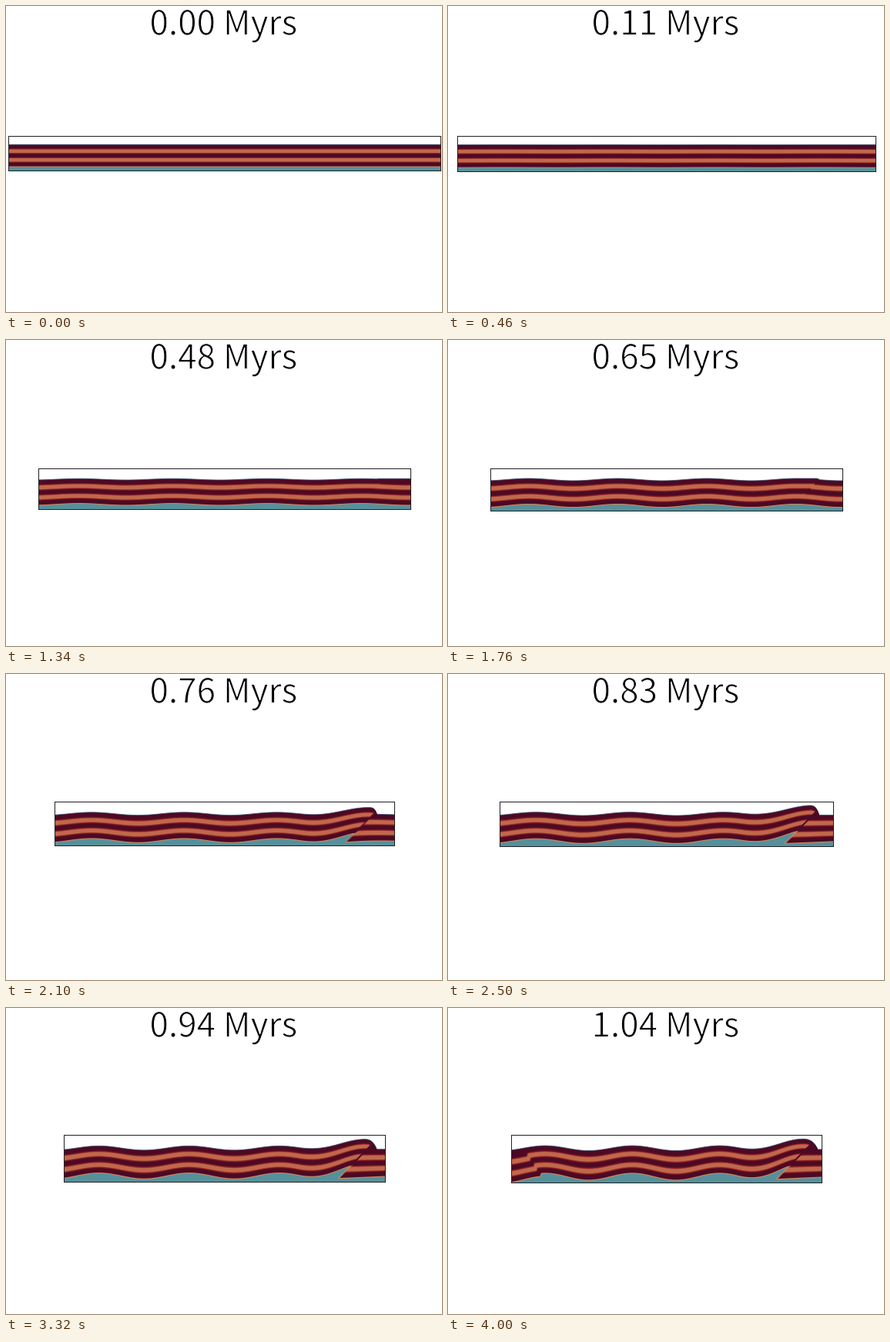
A matplotlib script for the animation above (4.02 s loop, 566 by 398 pixels).

```python
import numpy as np
import matplotlib.pyplot as plt
from matplotlib.animation import FuncAnimation
from matplotlib.patheffects import Stroke

W, H, DPI, FRAMES = 566, 398, 100, 201
Y0, Y1 = 160, 232

DARK, RED, ORANGE = (77, 9, 36), (134, 28, 30), (193, 104, 76)
TEAL, BLUE, SAND = (86, 144, 154), (62, 82, 112), (206, 136, 92)
WHITE, BORDER = (255, 255, 255), (32, 32, 36)

# Colours against depth, one unit per layer: two orange beds in dark rock
STOPS = [k + d for k in range(1, 5) for d in (-.2, 0, .2)] + [4.88, 5.02, 5.18]
RAMP = np.array([DARK, RED, ORANGE, ORANGE, RED, DARK] * 2
                + [DARK, SAND, TEAL], float)

x = np.arange(W) + 0.5
y = (np.arange(Y0, Y1) + 0.5)[:, None]


def clock(i):
    """Model age in Myrs; the time step shrinks as faults open."""
    return np.interp(i, [0, 27, 39, 88, 107, 200],
                     [0, .125, .243, .654, .777, 1.04])


def smooth(p):
    p = np.clip(p, 0, 1)
    return p * p * (3 - 2 * p)


def mix(img, color, weight):
    w = weight[..., None]
    return img * (1 - w) + np.array(color, float) * w


def strip(t):
    # The box shortens and thickens
    left = int(3.3 + t * (86 - 9.8 * t))
    right = 567 - left
    width = right - left
    top, bottom = round(169.2 - 4 * t), int(214 + 12.8 * t)
    u = (x - left - 0.5) / width

    # Buckling folds
    thrust = smooth((t - .65) / .18)
    wavelength = .253 + .028 * thrust
    fold = lambda u: -np.cos(2 * np.pi * (u - .108) / wavelength)
    surf_mid, base_mid = 180.2 + 2 * t, 208.8 + 10 * t
    surf_amp = 3 * t ** 1.7
    base_amp = 1.4 * surf_amp

    # Right block: its folds flatten once the thrust is active
    flat = lambda value, target: value + thrust * (target - value)
    foot_s = flat(surf_mid + surf_amp * fold(u), surf_mid + 1.6)
    foot_b = flat(base_mid + base_amp * fold(u),
                  base_mid + 3.2 - 18 * (u - .857))

    # Thrust sheet climbing over it, with a rounded nose
    rise = thrust * smooth((u - .73) / .19)
    held = fold(np.minimum(u, .108 + 3 * wavelength))
    hang_s = surf_mid + surf_amp * held - 9 * rise
    hang_b = base_mid + base_amp * held - 13 * rise
    nose = .958 + .14 * (t - .83)
    drop = np.clip((u - .92) / (nose - .92), 0, 1) ** 4
    hang_s += (foot_s - hang_s) * drop

    # Late back thrust at the left
    slip = 4 * smooth((t - .95) / .09)
    back = left + 30 - (204.5 - y) * .67
    shift = slip * smooth((back - x) / 6 + .5)

    depth = lambda s, b: 5 * (y - shift - s) / (b - s)
    hang, foot = depth(hang_s, hang_b), depth(foot_s, foot_b)
    gap = .71 * (x - left - .857 * width - (base_mid + 2.5 - y) * .98)
    v = np.where(gap < 0, hang, foot)

    img = np.stack([np.interp(v, STOPS, channel) for channel in RAMP.T], -1)
    seam = thrust * np.clip(1.5 - np.abs(gap), 0, 1) * (foot < 5)
    img = mix(img, DARK, seam * (hang < 5))
    img = mix(img, SAND, .7 * seam * (hang >= 5))

    d = y - hang_s
    img = mix(img, WHITE, np.clip(.5 - d, 0, 1))
    img = mix(img, BLUE, .75 * np.clip(1 - np.abs(d), 0, 1))

    img[:, :left] = img[:, right + 1:] = 255
    img[:top - Y0] = img[bottom + 1 - Y0:] = 255
    img[[top - Y0, bottom - Y0], left:right + 1] = BORDER
    img[top - Y0:bottom + 1 - Y0, [left, right]] = BORDER
    return img.round().astype(np.uint8)


fig = plt.figure(figsize=(W / DPI, H / DPI), dpi=DPI, facecolor="white")
ax = fig.add_axes([0, 0, 1, 1])
ax.axis("off")
section = ax.imshow(strip(0), extent=(0, W, Y1, Y0), interpolation="nearest",
                    aspect="auto")
ax.set_xlim(0, W)
ax.set_ylim(H, 0)
# A white outline thins the letters
label = ax.text(186.5, 37.5, "", family="Noto Sans CJK JP", va="baseline",
                size=44 * 72 / DPI, color="black",
                path_effects=[Stroke(linewidth=.7, foreground="white")])


def update(i):
    t = clock(i)
    section.set_data(strip(t))
    label.set_text(f"{t:.2f} Myrs")
    return section, label


anim = FuncAnimation(fig, update, frames=FRAMES, interval=20, repeat=True,
                     repeat_delay=0)
plt.show()
```
